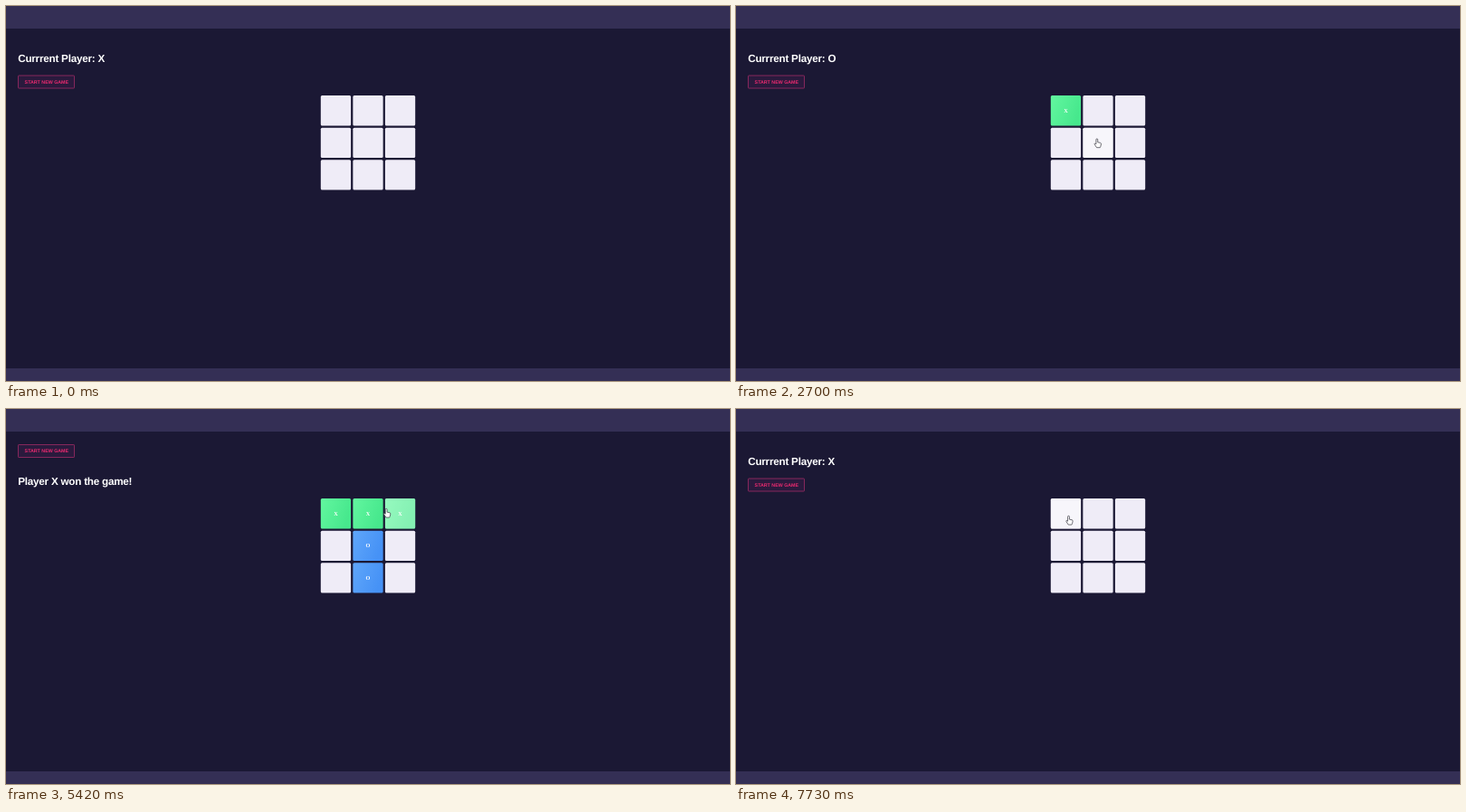
Recreate the animation shown at these times as an HTML page. Size 800x415 px, loop 7.76 s.

```html
<!DOCTYPE html>
<html lang="en">
<head>
<meta charset="utf-8">
<title>Tic-tac-toe</title>
<style>
  html, body { margin: 0; width: 100%; height: 100%; overflow: hidden; background: #1b1834; }
  svg { display: block; width: 800px; height: 415px; }
  text { text-rendering: geometricPrecision; }
  .bar { fill: #342f55; }
  .title { font: bold 11.7px "Liberation Sans", Arial, sans-serif; letter-spacing: -.02em; fill: #fff; }
  .label { font: bold 5.3px "Liberation Sans", Arial, sans-serif; fill: #ee2a70; }
  .mark { font: bold 6.2px "Liberation Serif", Times, serif; fill: #fff; text-anchor: middle; }
  .button rect { fill: #2a1a3d; stroke: #86275c; }
  .button .ring { fill: #57496f; stroke: #8d7d9f; display: none; }
  .focus .ring { display: inline; }
  .focus .box { fill: none; stroke: #a4527f; stroke-width: .6; }
  .cursor path { fill: #fff; stroke: #3a3a44; stroke-width: .8; stroke-linejoin: round; }
</style>
</head>
<body>
<svg viewBox="0 0 800 415">
  <defs>
    <linearGradient id="X" x2="1" y2=".35"><stop stop-color="#62f69f"/><stop offset="1" stop-color="#47e88d"/></linearGradient>
    <linearGradient id="O" x2="1" y2=".35"><stop stop-color="#5fa6fa"/><stop offset="1" stop-color="#4692f6"/></linearGradient>
  </defs>
  <rect class="bar" width="800" height="25"/>
  <rect class="bar" y="401" width="800" height="14"/>
  <text class="title" id="title" x="13.2"></text>
  <g class="button" id="button">
    <rect class="ring" x="12" y="-1" width="65" height="16.6" rx="2"/>
    <rect class="box" x="13.5" y=".5" width="62" height="14" rx=".6"/>
    <text class="label" x="20.6" y="9.4">START NEW GAME</text>
  </g>
  <g id="board"></g>
  <g class="cursor" id="cursor">
    <path id="hand" transform="translate(.5 .3) scale(.92)" d="M-1 1q0-1 1-1t1 1v3.2l3 .6q1.2.3 1 1.6l-.5 2.4q-.2.9-.8 1.8h-4L-2.7 6.9q-.6-1 .2-1.3q.7-.1 1.5.8z"/>
    <path id="arrow" d="M0 0V8.6L2 6.8L3.4 10L4.8 9.4L3.4 6.3H6z"/>
  </g>
</svg>
<script>
const LOOP = 7760, TRAVEL = 700;
const SIZE = 33.3, PITCH = 35.55, LEFT = 400 - PITCH - SIZE / 2, TOP = 99.1;

// Places the pointer reaches, and when it clicks there
const stops = [
  { at: 30, x: 739, y: 150 },
  { at: 420, x: 688, y: 164 },
  { at: 1390, x: 446, y: 158 },
  { at: 1730, x: 369, y: 113, click: 2210 },
  { at: 2850, x: 403, y: 152, click: 3050 },
  { at: 3500, x: 405.5, y: 117, click: 3800 },
  { at: 4480, x: 411.5, y: 181, click: 4640 },
  { at: 5180, x: 419.7, y: 110, click: 5330 },
  { at: 6120, x: 46, y: 45, click: 6700 },
  { at: 6970, x: 106.5, y: 51 },
  { at: 7730, x: 367, y: 118 }
];
const clicks = stops.filter(s => s.click);
const reset = clicks.pop().click, win = clicks[clicks.length - 1].click, blur = reset + 820;

const $ = id => document.getElementById(id);
const add = (tag, attrs, parent) => {
  const el = document.createElementNS("http://www.w3.org/2000/svg", tag);
  for (const k in attrs) el.setAttribute(k, attrs[k]);
  return parent.appendChild(el);
};
const inside = (p, x, y, w, h) => p.x >= x && p.x <= x + w && p.y >= y && p.y <= y + h;
const show = (id, on) => $(id).style.display = on ? "" : "none";

const cells = Array.from({ length: 9 }, (_, i) => {
  const x = LEFT + i % 3 * PITCH, y = TOP + Math.floor(i / 3) * PITCH;
  const box = { x, y, width: SIZE, height: SIZE, rx: 1.5 };
  return {
    base: add("rect", box, $("board")),
    mark: add("text", { class: "mark", x: x + SIZE / 2, y: y + SIZE / 2 + 2 }, $("board")),
    glow: add("rect", { ...box, fill: "#fff" }, $("board")),
    hit: p => inside(p, x, y, SIZE, SIZE)
  };
});

function pointer(t) {
  const i = stops.findIndex(s => s.at > t);
  if (i < 1) return i ? stops[stops.length - 1] : stops[0];
  const a = stops[i - 1], b = stops[i];
  const from = Math.max(a.click || a.at, b.at - TRAVEL);
  const k = Math.max(0, (t - from) / (b.at - from)), e = k * k * (3 - 2 * k);
  return { x: a.x + (b.x - a.x) * e, y: a.y + (b.y - a.y) * e };
}

function draw(t) {
  const played = t < reset ? clicks.filter(c => t >= c.click) : [];
  const over = t >= win && t < reset;
  const buttonY = over ? 39 : 76.5;

  $("title").textContent = over ? "Player X won the game!" : "Currrent Player: " + "XO"[played.length % 2];
  $("title").setAttribute("y", over ? 84 : 61.6);
  $("button").setAttribute("transform", `translate(0 ${buttonY})`);
  $("button").classList.toggle("focus", t >= reset && t < blur);

  const p = pointer(t), shown = t >= stops[0].at;
  let hand = inside(p, 13, buttonY, 63, 15);
  for (const c of cells) {
    const mark = "XO"[played.findIndex(c.hit) % 2] || "";
    const hover = shown && c.hit(p);
    hand = hand || hover;
    c.base.setAttribute("fill", mark ? `url(#${mark})` : "#efecf7");
    c.mark.textContent = mark;
    c.glow.setAttribute("opacity", hover ? (mark ? .33 : .55) : 0);
  }

  $("cursor").setAttribute("transform", `translate(${p.x.toFixed(2)} ${p.y.toFixed(2)})`);
  show("cursor", shown);
  show("hand", hand);
  show("arrow", !hand);
}

const start = performance.now();
function tick() {
  draw((performance.now() - start) % LOOP);
  requestAnimationFrame(tick);
}
tick();
</script>
</body>
</html>
```
